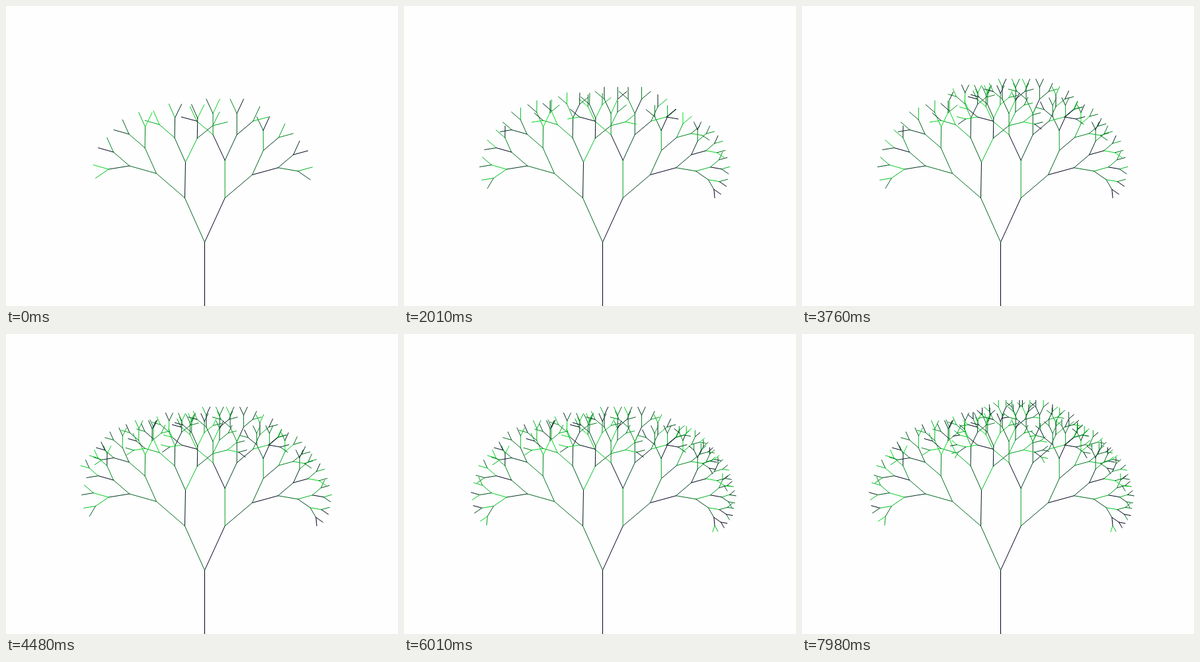
An HTML page with a canvas that plays this animation: 593x454 px, repeating every 8 s.

```html
<!DOCTYPE html>
<html lang="en">
<head>
<meta charset="utf-8">
<title>Growing tree</title>
<style>
  html, body { margin: 0; width: 100%; height: 100%; overflow: hidden; background: #fefefe; }
  canvas { display: block; }
</style>
</head>
<body>
<canvas id="stage" width="593" height="454"></canvas>
<script>
const ctx = document.getElementById('stage').getContext('2d');
const LOOP = 8000;
const STEP = 87.2;      // ms between growth steps
const PER_STEP = 3.6;   // branches added by one step
const START = 63;       // branches already grown when the loop begins
const TOTAL = 511;
const SPREAD = 25 * Math.PI / 180;
const SHRINK = 0.75;
const ROOT = { x: 300.5, y: 455 };

// Ends and green of the trunk and the main limbs, right to left.
const limbs = [
  { x: 300.5, y: 357.5, green: 0 },
  { x: 331.2, y: 290.5, green: 0 },
  { x: 270.5, y: 290.5, green: 100 },
  { x: 372.4, y: 255.5, green: 70 },
  { x: 331.2, y: 233.5, green: 160 },
  { x: 271.5, y: 236.5, green: 20 },
  { x: 227.6, y: 253.5, green: 110 }
];

let seed = 11;
function random() {
  seed = (seed * 16807) % 2147483647;
  return seed / 2147483647;
}

function sprout(base, side) {
  const angle = base.angle + side * SPREAD;
  const length = base.length * SHRINK;
  return {
    x: base.x + Math.cos(angle) * length,
    y: base.y + Math.sin(angle) * length,
    green: Math.floor(random() * 225)
  };
}

// Children of branch i are 2i + 1 (right) and 2i + 2 (left).
const branches = [];
for (let i = 0; i < TOTAL; i++) {
  const base = i ? branches[(i - 1) >> 1] : ROOT;
  const end = limbs[i] || sprout(base, i % 2 ? 1 : -1);
  const dx = end.x - base.x, dy = end.y - base.y;
  branches.push({
    x: end.x, y: end.y, base,
    angle: Math.atan2(dy, dx),
    length: Math.hypot(dx, dy),
    color: `rgb(0, ${end.green}, 30)`
  });
}

function draw(t) {
  const steps = Math.floor(t / STEP);
  const grown = Math.max(0, Math.floor(PER_STEP * steps - 1));
  ctx.fillStyle = '#fefefe';
  ctx.fillRect(0, 0, 593, 454);
  ctx.lineWidth = 1;
  ctx.lineCap = 'round';
  for (const { x, y, base, color } of branches.slice(0, START + grown)) {
    ctx.strokeStyle = color;
    ctx.beginPath();
    ctx.moveTo(base.x, base.y);
    ctx.lineTo(x, y);
    ctx.stroke();
  }
}

const begin = performance.now();
function frame() {
  draw((performance.now() - begin) % LOOP);
  requestAnimationFrame(frame);
}
draw(0);
requestAnimationFrame(frame);
</script>
</body>
</html>
```
